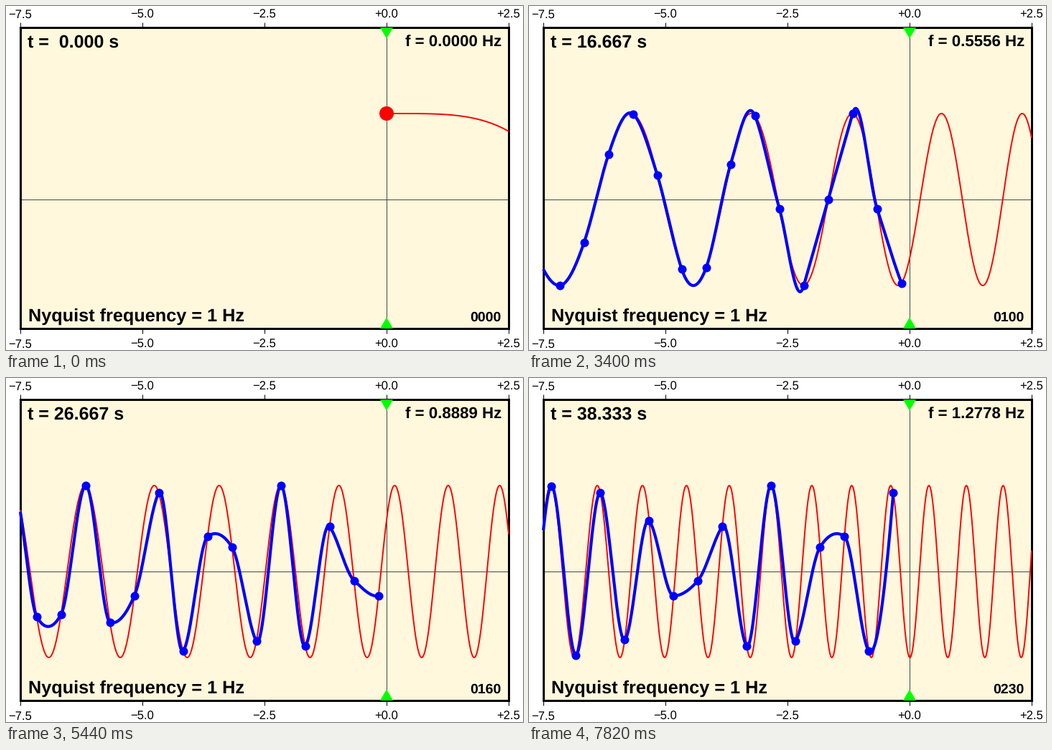
These frames come from a looping animation (720x480 px, 7.99 s). A matplotlib script:

```python
import numpy as np
import matplotlib.pyplot as plt
from matplotlib.animation import FuncAnimation
from matplotlib.patches import Circle, Polygon, Rectangle

W, H, DPI = 720, 480, 100
PX = 72 / DPI                # one pixel in points
LEFT, RIGHT, TOP, BOTTOM = 20, 700, 30, 450
X0, Y0 = 530, 270            # position of "now" and of zero amplitude
UNIT, AMP = 68, 120          # pixels per second, pixels per amplitude
PAST, AHEAD = 7.5, 2.5       # seconds shown on either side of "now"
SWEEP = 30                   # the frequency rises by 1 Hz in this many seconds
STEP = 0.5                   # sampling interval for a Nyquist frequency of 1 Hz
FRAMES, INTERVAL, SKIP = 47, 170, 5

plt.rcParams.update({
    "font.family": "Liberation Sans",
    "text.hinting": "none",
    "text.kerning_factor": 6,
})

fig = plt.figure(figsize=(W / DPI, H / DPI), dpi=DPI, facecolor="white")
ax = fig.add_axes([0, 0, 1, 1])
ax.set_xlim(0, W)
ax.set_ylim(H, 0)
ax.axis("off")


def chirp(t):
    return Y0 - AMP * np.cos(np.pi * t**2 / SWEEP)


def akima(xs, ys, x):
    """Akima spline through equally spaced points."""
    if len(xs) < 3:
        return np.interp(x, xs, ys)
    h = xs[1] - xs[0]
    m = np.diff(ys) / h
    a, b = 2 * m[0] - m[1], 2 * m[-1] - m[-2]
    m = np.concatenate([[2 * a - m[0], a], m, [b, 2 * b - m[-1]]])
    d = np.abs(np.diff(m))
    w1, w2 = d[2:], d[:-2]
    total = w1 + w2
    flat = total < 1e-9
    slope = np.where(flat, (m[1:-2] + m[2:-1]) / 2,
                     (w1 * m[1:-2] + w2 * m[2:-1]) / np.where(flat, 1, total))
    i = np.clip(((x - xs[0]) / h).astype(int), 0, len(xs) - 2)
    s = (x - xs[i]) / h
    return (ys[i] * (1 + 2 * s) * (1 - s)**2
            + ys[i + 1] * s**2 * (3 - 2 * s)
            + h * slope[i] * s * (1 - s)**2
            - h * slope[i + 1] * s**2 * (1 - s))


def line(xs, ys, color, width, z):
    return ax.plot(xs, ys, color=color, lw=width, zorder=z,
                   solid_capstyle="butt", solid_joinstyle="round")[0]


def label(x, y, text, size, ha="left", weight="bold"):
    return ax.text(x, y, text, fontsize=size, ha=ha, va="baseline",
                   weight=weight, color="black", zorder=9)


# Fixed parts: whole coordinates snap to the pixel that starts there
ax.add_patch(Rectangle((LEFT, TOP), RIGHT - LEFT, BOTTOM - TOP,
                       fc="cornsilk", ec="none", zorder=0))
line([LEFT, RIGHT], [Y0, Y0], "#4a473f", PX, 1)
line([X0, X0], [TOP, BOTTOM], "#4a473f", PX, 1)
ax.add_patch(Rectangle((LEFT, TOP), RIGHT - LEFT, BOTTOM - TOP,
                       fc="none", ec="black", lw=3 * PX, zorder=2))
for value in np.arange(-7.5, 2.6, 2.5):
    x = X0 + UNIT * value
    name = f"{value:+.1f}".replace("-", "\u2212")
    for edge, out, base in ((TOP, -7, 17), (BOTTOM, 7, 477)):
        line([x, x], [edge, edge + out], "black", PX, 2)
        label(x - 0.3, base, name, 12, "center", "normal")
for edge, tip in ((TOP, 45.5), (BOTTOM, 434.5)):
    ax.add_patch(Polygon([(X0 - 9, edge), (X0 + 9, edge), (X0, tip)],
                         fc="lime", ec="none", zorder=3))
label(31, 440, "Nyquist frequency = 1 Hz", 18.2)

# Moving parts
signal = line([], [], "red", 1.4, 4)
rebuilt = line([], [], "blue", 3, 5)
dots = ax.scatter([], [], s=(12 * PX)**2, c="blue", linewidths=0, zorder=6,
                  snap=False)
dots.set_clip_path(Rectangle((LEFT, TOP), RIGHT - LEFT, BOTTOM - TOP,
                             transform=ax.transData))
pulse = ax.add_patch(Circle((X0, Y0), 10, fc="red", ec="none", zorder=7))
time_text = label(30, 58, "", 18)
freq_text = label(690, 56.5, "", 16, "right")
count_text = label(690, 440, "", 14, "right")


def draw(i):
    n = i * SKIP
    now = n / 6
    start = max(0, now - PAST)

    def to_x(t):
        return X0 + UNIT * (t - now)

    t = np.linspace(start, now + AHEAD, 900)
    signal.set_data(to_x(t), chirp(t))

    ts = STEP * np.arange(n // 3 + 1)
    ys = chirp(ts)
    if len(ts) > 1:
        t = np.linspace(start, ts[-1], 700)
        rebuilt.set_data(to_x(t), akima(ts, ys, t))
    else:
        rebuilt.set_data([], [])

    shown = ts >= start - 1e-6
    dots.set_offsets(np.column_stack([to_x(ts[shown]), ys[shown]]))
    pulse.center = (X0, chirp(now))
    pulse.set_visible(n % 3 == 0)

    time_text.set_text(f"t = {now:6.3f} s")
    freq_text.set_text(f"f = {now / SWEEP:.4f} Hz")
    count_text.set_text(f"{n:04d}")
    return signal, rebuilt, dots, pulse, time_text, freq_text, count_text


anim = FuncAnimation(fig, draw, frames=FRAMES, interval=INTERVAL,
                     repeat=True, repeat_delay=0)
plt.show()
```
